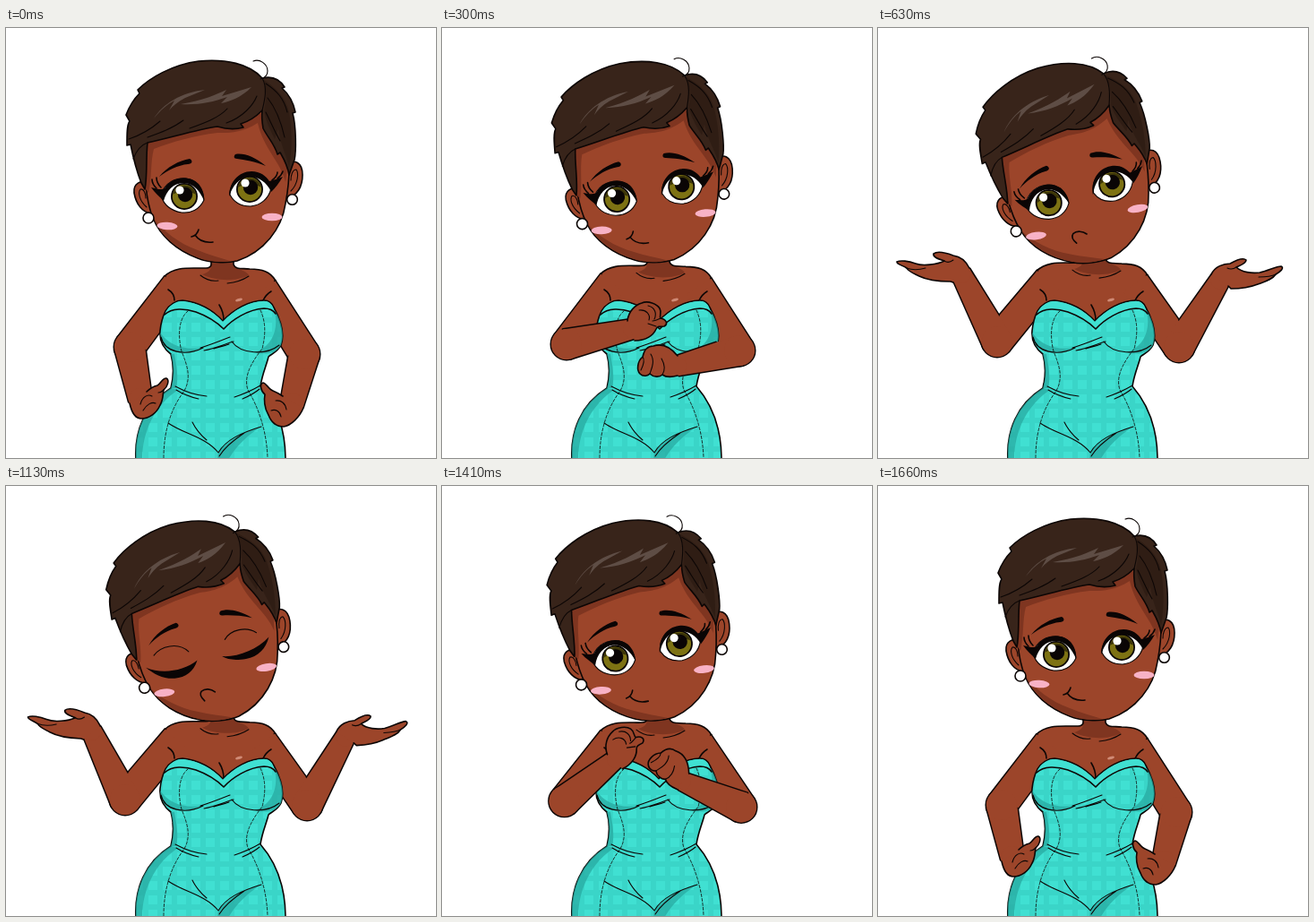
Recreate the animation shown at these times as an HTML page. Size 480 px wide and 480 px high, loop 1710 ms.

```html
<!DOCTYPE html>
<html lang="en">
<head>
<meta charset="utf-8">
<title>Shrug</title>
<style>
html, body { margin: 0; width: 100%; height: 100%; overflow: hidden; background: #fff; }
svg { display: block; width: 100vw; height: 100vh; }
.skin { fill: #9c452a; }
.line { stroke: #0c0605; stroke-width: 1.6; stroke-linecap: round; stroke-linejoin: round; }
.edge { fill: none; stroke: #0c0605; stroke-width: 3; stroke-linecap: round; }
.thin { stroke-width: 1.1; }
.none { fill: none; }
.shade { fill: #7f3520; }
.hair { fill: #38241a; }
.ink { fill: #0a0505; }
.fold { fill: #27a89f; }
</style>
</head>
<body>
<svg viewBox="0 0 480 480">
  <defs>
    <pattern id="plaid" x="9" y="3" width="16" height="16" patternUnits="userSpaceOnUse">
      <rect width="16" height="16" fill="#40e0d2"/>
      <path d="M0 0H6V16H0ZM0 0H16V6H0Z" fill="#22a9a0" opacity=".2"/>
    </pattern>
    <g id="iris">
      <circle r="15" class="ink"/>
      <circle r="13.2" fill="#7d7213"/>
      <path d="M-13 -2C-10 -16 10 -16 13 -2C8 -6 -8 -6 -13 -2Z" fill="#3c3509"/>
      <circle cx="1" cy="-2" r="8.200" class="ink"/>
      <circle cx="-5" cy="-7" r="4.600" fill="#fff"/>
    </g>
  </defs>

  <g id="torso">
    <path id="chest" class="skin"/>
    <path id="neck" class="shade"/>
    <path id="slope" class="line none"/>
    <path id="bones" class="line thin none"/>
  </g>
  <g id="upper"></g>
  <path d="M181 292C186 295 188 299 188 304M296 294C291 297 289 300 287 304M238 309C241 314 243 319 243 326" class="line none"/>
  <ellipse cx="260" cy="303.5" rx="4" ry="1.5" fill="#d08b76" transform="rotate(-15 260 303.5)"/>

  <g id="dress">
    <path fill="url(#plaid)" class="line" d="M178 316C182 309 190 304 197 304C215 306 230 314 242 327C254 314 272 304 288 304C294 304 297 307 299 312C306 325 312 340 307 354C303 362 296 364 293 367C291 376 286 386 284 400C298 416 312 440 312 482L145 482C143 450 155 420 184 402C187 390 187 375 184 364C176 358 171 350 172 338C173 328 175 322 178 316Z"/>
    <g class="fold" opacity=".7">
      <path d="M184 402C155 420 143 450 145 482H152C152 452 165 422 192 404Z"/>
      <path d="M300 315C306 325 312 340 307 354C303 362 290 366 278 362C299 354 304 335 300 315Z"/>
      <path d="M172 340C173 354 182 364 200 362C208 361 214 359 219 357C198 360 182 354 172 340Z"/>
      <path d="M184 364C188 380 187 392 184 402L190 402C193 390 190 375 188 364Z"/>
      <path d="M237 474C248 460 264 452 283 446C268 456 256 468 248 482H236Z"/>
    </g>
    <path fill="#40e0d2" d="M178 318C182 309 190 305 197 305C215 307 230 315 242 328C254 315 272 305 288 305C294 305 297 308 300 317C296 313 292 313 288 313C270 314 252 326 243 336C236 329 226 322 212 317C200 313 185 312 178 318Z"/>
    <path class="line none" d="M177 320C185 312 200 313 212 317C226 322 236 329 243 336C252 326 270 314 288 313C296 313 299 316 301 319"/>
    <path class="line none" stroke-dasharray="3 2" style="stroke-width:.8" d="M203 316C192 325 192 345 196 361C204 380 206 392 199 405C184 425 176 450 176 480M284 315C290 328 290 342 286 358C270 378 266 392 270 404C282 424 291 450 292 480"/>
    <path class="line thin none" d="M173 345C177 362 200 367 220 357M252 350C262 364 290 366 305 354M217 357C228 354 240 349 250 345M221 360C232 358 244 353 254 350M232 358C238 356 244 355 249 353M189 400C200 406 212 410 224 411M190 404C198 409 206 412 215 414M284 399C274 405 264 409 255 412M283 403C277 408 271 411 264 414"/>
    <path class="line thin none" d="M181 441C200 454 222 456 237 474C245 460 262 452 285 445M266 452C254 460 244 468 238 478M208 440C212 448 218 455 224 460"/>
  </g>

  <g id="head">
    <path class="skin line" d="M160 175C150 168 142 174 143 184C145 196 152 206 162 207ZM314 152C322 146 331 150 331 164C331 176 326 188 312 190Z"/>
    <path class="line thin none" d="M157 200C149 193 147 184 150 180C154 179 156 185 156 190M318 182C326 174 327 162 324 158C320 158 318 164 318 170"/>
    <path class="skin line" d="M155 125C155 165 155 190 164 212C172 232 190 248 214 257C226 262 246 263 258 260C288 250 308 224 312 196C317 170 318 140 312 110L290 80H200Z"/>
    <path class="shade" d="M165 213C173 232 191 247 214 256C226 261 240 262 250 260C238 256 226 253 214 248C192 240 176 227 165 213Z"/>
    <path class="shade" d="M157 115L280 85L288 104C292 124 306 136 314 156L312 172C306 148 288 136 281 106C262 118 248 117 236 117C210 120 186 127 165 135C161 150 163 168 159 184L156 180Z"/>
    <circle cx="159" cy="212" r="6" fill="#fff" class="line"/>
    <circle cx="319.500" cy="191.500" r="5.800" fill="#fff" class="line"/>
    <g fill="#f8b2c6">
      <ellipse cx="180" cy="221" rx="11.5" ry="4.300" transform="rotate(3 180 221)"/>
      <ellipse cx="297" cy="211" rx="11.5" ry="4.300"/>
    </g>
    <path class="hair line" d="M151 173C146 160 142 145 139 130L135 131C135 118 135 108 138 104L134 97C139 84 146 76 149 73L147 69C160 56 185 41 215 37C245 34 272 40 286 56C298 53 306 58 311 66L308 67C316 74 321 84 323 94L320 95C324 110 324 138 322 147L316 164C314 152 310 146 306 139L303 141C300 130 292 122 287 112C286 106 285 100 286 92C280 98 272 104 262 107L265 111C254 114 246 113 236 110C215 113 185 122 158 128C156 145 158 165 155 180Z"/>
    <path fill="#2a1911" opacity=".6" d="M288 58C300 66 312 76 316 94C319 112 320 132 316 156C312 138 306 130 304 112L300 124C294 112 290 104 288 92C291 80 291 68 288 58Z"/>
    <path class="line thin none" d="M286 56C292 66 289 80 286 92M290 62C302 70 310 78 314 94M292 78C300 88 306 100 311 122M290 94C296 106 300 116 306 126M137 124C152 119 164 111 172 104M158 122C172 117 186 112 198 103M205 112C222 106 238 100 247 90M246 106C264 100 276 86 280 76M142 146C146 136 152 130 158 128"/>
    <path fill="#5e4d45" d="M165 101C175 85 195 72 222 69L200 78C192 82 186 87 182 92L188 81C180 85 172 92 165 101ZM195 85C220 81 235 74 246 69L241 76L274 66C262 78 250 82 240 84L247 77C230 83 215 86 195 85Z"/>
    <path class="line thin none" d="M276 37C283 34 292 40 292 48C292 53 288 56 284 57"/>
    <path class="ink" d="M171 166C180 155 193 148 205 146C209 148 208 152 203 152C192 153 180 159 171 166ZM256 141C264 139 277 143 290 154C278 149 266 147 258 146C254 146 254 143 256 141Z"/>
    <g id="open">
      <path fill="#fff" class="line thin" d="M173 187C177 172 190 167 201 168C212 169 220 179 221 192C216 203 206 207 196 206C184 204 176 197 173 187ZM250 186C250 172 260 163 272 162C284 162 292 170 296 179C293 191 284 198 273 199C262 199 254 194 250 186Z"/>
      <use href="#iris" x="199" y="188"/>
      <use href="#iris" x="272" y="180"/>
      <path class="ink" d="M162 178C170 180 174 181 177 179C184 167 204 163 215 174C219 179 222 186 221 193C217 182 209 174 200 173C188 172 179 181 176 193C172 189 166 184 162 178ZM249 188C249 172 260 160 274 160C284 160 290 165 294 171C298 170 304 168 309 166C305 173 300 179 296 183C291 172 282 166 272 166C260 167 253 176 249 188Z"/>
      <path class="line none" d="M168 179C164 175 163 172 163 169M173 178C169 174 168 170 168 167M297 170C301 167 303 164 303 161M303 168C306 166 308 163 309 160"/>
    </g>
    <g id="shut">
      <path class="ink" d="M164 190C180 200 205 201 222 191C216 203 206 208 194 207C182 206 172 199 164 190ZM250 191C266 195 290 190 305 178C300 190 290 198 276 198C264 198 256 196 250 191Z"/>
      <path class="line thin none" d="M175 178C184 169 204 167 214 180M256 173C264 163 282 162 292 171"/>
    </g>
    <path id="mouth" class="line none"/>
  </g>
  <g id="lower"></g>
</svg>
<script>
const LOOP = 1710, PIVOT = "240 246", ELBOW = 17;
const $ = id => document.getElementById(id);
const rad = a => a * Math.PI / 180;
const mix = (a, b, k) => a + (b - a) * k;

// time, head tilt, arm phase (0 hips, 1 crossed, 2 chin, 3 shrug)
const keys = [
  [0, 0, 0], [100, -.5, .1], [150, -1.5, .3], [200, -2.5, .55], [250, -3.6, .8],
  [300, -4.6, 1], [400, -7, 2], [470, -9, 2.6], [550, -10.8, 3.08], [630, -10.2, 3],
  [1130, -9.1, 2.95], [1180, -8.7, 2.7], [1230, -8.3, 2.3], [1280, -7.9, 2],
  [1360, -6.8, 1.4], [1430, -5, .7], [1510, -3.2, 0], [1560, -2, 0], [1610, -.8, 0], [1660, 0, 0]
];
const shutSpans = [[1130, 1230], [1510, 1610]];
const smile = "M207 233C211 232 214 229 215 225M211 231C215 237 222 240 231 239";
const frown = "M223 237C219 232 219 228 221 226C226 223 232 225 236 229";
const wristSize = [13, 11, 9, 11];

const arms = [
  {
    side: 1, sx: 190, sy: 287,
    ex: [138, 139, 133, 133], ey: [356, 353, 350, 350],
    angle: [78.5, -13, -78.7, -118], len: [60, 76, 71, 86],
    hands: [
      ["M138 419C140 428 144 436 151 436C160 436 168 430 172 421C176 414 175 407 176 404C180 401 183 393 179 391C175 390 173 397 169 399C165 400 160 403 157 406",
       "M150 420C152 412 158 408 163 411M153 427C157 420 163 417 167 419M176 404C174 406 172 407 170 407"],
      ["M207 327C208 316 216 309 223 307C230 304 240 308 243 313C246 318 242 322 244 324C250 325 253 330 248 333C243 333 240 333 239 336C236 343 228 349 215 349",
       "M220 315C228 314 233 320 231 326M230 310C238 312 240 319 237 325M244 324C240 326 238 327 235 327M239 333L230 330"],
      ["M138 277C141 264 158 252 172 248C184 244 204 246 213 247C218 249 214 252 208 252C200 252 196 253 192 254C200 256 212 262 216 267C217 271 212 270 208 268C214 274 205 275 199 271C204 277 198 279 191 275C182 271 170 270 164 274C160 277 157 280 156 283",
       "M188 257C196 260 204 264 208 268M182 263C190 265 196 268 199 271"],
      ["M102 268C98 260 92 255 84 254C76 251 66 249 62 252C61 256 68 258 74 260C66 264 50 266 42 263C34 260 25 259 21 261C21 264 28 265 32 268C34 272 40 274 46 277C56 282 72 283 81 283L84 284",
       "M32 268C40 271 46 270 53 268M84 259C80 262 77 262 74 260"]
    ]
  },
  {
    side: -1, sx: 287, sy: 291,
    ex: [333, 332, 337, 336], ey: [364, 360, 356, 356],
    angle: [104, 166, 260, 301.5], len: [57.7, 72, 72, 88],
    hands: [
      ["M332 424C328 434 318 444 310 445C302 445 296 440 293 432C288 424 288 414 289 409C284 405 283 397 287 396C290 396 293 403 298 405C303 407 306 409 309 411",
       "M301 416C307 415 312 419 313 426M296 427C301 425 306 428 307 434"],
      ["M263 366C254 355 245 352 236 355C228 355 225 362 224 367C218 372 217 382 221 386C225 390 230 388 232 386C236 390 243 390 246 387C250 390 256 390 263 388",
       "M224 367C227 371 224 378 222 382M233 364C238 372 234 380 232 386M245 369C249 376 249 382 246 387"],
      ["M333 283C328 268 312 259 302 255C290 251 268 254 256 259C250 262 254 265 260 264C266 263 272 262 276 263C266 266 252 272 249 277C249 281 256 280 262 276C256 281 254 285 257 286C262 286 268 282 273 279C267 284 266 289 271 289C278 288 286 282 294 284C302 283 312 284 315 288",
       "M262 276C268 272 274 270 279 269M273 279C278 276 282 275 286 274"],
      ["M372 275C376 266 386 263 393 263C400 259 408 256 411 259C411 263 404 265 400 267C406 273 418 274 426 273C436 271 444 266 450 266C454 268 449 272 444 275C440 281 432 283 424 286C414 290 402 291 394 291L391 288",
       "M444 275C438 278 432 278 425 278M390 268C394 270 397 269 400 267"]
    ]
  }
];

function add(parent, tag, cls) {
  const el = document.createElementNS("http://www.w3.org/2000/svg", tag);
  el.setAttribute("class", cls);
  return parent.appendChild(el);
}
const set = (el, name, value) => el.setAttribute(name, value);
const show = (el, on) => set(el, "visibility", on ? "visible" : "hidden");
const pt = p => p[0].toFixed(2) + " " + p[1].toFixed(2);
const between = (a, b, k) => [mix(a[0], b[0], k), mix(a[1], b[1], k)];
const heading = (a, b) => Math.atan2(b[1] - a[1], b[0] - a[0]);

function disc(el, c, r) {
  set(el, "cx", c[0]);
  set(el, "cy", c[1]);
  set(el, "r", r);
}

function track(list, phase) {
  const i = Math.min(2, Math.floor(phase));
  return mix(list[i], list[i + 1], phase - i);
}

// the four corners of a tapered limb
function limb(a, b, ra, rb) {
  const d = heading(a, b);
  const at = (p, r) => [p[0] - Math.sin(d) * r, p[1] + Math.cos(d) * r];
  return [at(a, ra), at(b, rb), at(b, -rb), at(a, -ra)];
}

for (const arm of arms) {
  const up = $("upper"), low = $("lower");
  arm.upLine = add(up, "path", "edge");
  arm.capLine = add(up, "circle", "edge");
  arm.upFill = add(up, "path", "skin");
  arm.capFill = add(up, "circle", "skin");
  arm.lowLine = add(low, "path", "edge");
  arm.lowFill = add(low, "path", "skin");
  arm.elbow = add(low, "circle", "skin");
  arm.cuff = add(low, "circle", "skin");
  arm.hand = add(low, "g", "");
  arm.palm = add(arm.hand, "path", "skin line");
  arm.fingers = add(arm.hand, "path", "line thin none");
}

function wrist(arm, phase) {
  const a = rad(track(arm.angle, phase)), n = track(arm.len, phase);
  return [track(arm.ex, phase) + Math.cos(a) * n, track(arm.ey, phase) + Math.sin(a) * n];
}

function poseArm(arm, phase, lift) {
  const s = [arm.sx, arm.sy - lift];
  const e = [track(arm.ex, phase), track(arm.ey, phase)];
  const w = wrist(arm, phase), rw = track(wristSize, phase);
  const u = limb(s, e, 16, ELBOW), f = limb(e, w, ELBOW, rw);
  const [o1, o2, i1, i2] = arm.side > 0 ? [u[0], u[1], u[3], u[2]] : [u[3], u[2], u[0], u[1]];
  set(arm.upLine, "d", `M${pt(o1)}L${pt(o2)}M${pt(between(i1, i2, .4))}L${pt(i2)}`);
  set(arm.upFill, "d", `M${u.map(pt).join("L")}Z`);
  for (const c of [arm.capLine, arm.capFill, arm.elbow]) disc(c, e, ELBOW);
  disc(arm.cuff, w, rw - .3);

  // an open elbow hides the forearm edge up to the crook; a folded one shows it
  const diff = heading(e, w) - heading(s, e);
  const turn = Math.atan2(Math.sin(diff), Math.cos(diff));
  const folded = Math.abs(turn) > rad(125);
  const cut = folded ? 0 : ELBOW * Math.tan(Math.abs(turn) / 2) / track(arm.len, phase);
  const a = between(f[0], f[1], turn > 0 ? cut : 0);
  const b = between(f[3], f[2], turn < 0 ? cut : 0);
  set(arm.lowLine, "d", `M${pt(a)}L${pt(f[1])}M${pt(b)}L${pt(f[2])}`);
  set(arm.lowFill, "d", `M${f.map(pt).join("L")}Z`);

  const i = Math.min(3, Math.round(phase));
  const spin = track(arm.angle, phase) - arm.angle[i], base = wrist(arm, i);
  set(arm.palm, "d", arm.hands[i][0]);
  set(arm.fingers, "d", arm.hands[i][1]);
  set(arm.hand, "transform", `translate(${pt(w)}) rotate(${spin}) translate(${-base[0]} ${-base[1]})`);
}

function poseTorso(lift) {
  const y = v => (v - lift).toFixed(2);
  const left = `229 252V${y(264)}C229 ${y(269)} 222 ${y(268)} 214 ${y(268)}C202 ${y(268)} 188 ${y(267)} 177 ${y(277)}`;
  const right = `301 ${y(282)}C295 ${y(272)} 286 ${y(269)} 272 ${y(269)}C264 ${y(268)} 256 ${y(270)} 254 ${y(264)}V252`;
  set($("chest"), "d", `M${left}L180 335H304L${right}Z`);
  set($("slope"), "d", `M${left}M${right}`);
  set($("neck"), "d", `M229 252H254V${y(265)}C258 ${y(270)} 268 ${y(270)} 271 ${y(276)}C258 ${y(283)} 234 ${y(283)} 219 ${y(275)}C226 ${y(273)} 229 ${y(270)} 229 ${y(265)}Z`);
  set($("bones"), "d", `M217 ${y(276)}C223 ${y(281)} 230 ${y(283)} 237 ${y(282)}M247 ${y(285)}C257 ${y(284)} 265 ${y(281)} 271 ${y(277)}`);
}

function draw(t) {
  const [, tilt, phase] = keys.filter(k => k[0] <= t).pop();
  const lift = -tilt * .58;
  const shut = shutSpans.some(([a, b]) => t >= a && t < b);
  poseTorso(lift);
  for (const arm of arms) poseArm(arm, phase, lift);
  set($("head"), "transform", `rotate(${tilt} ${PIVOT})`);
  set($("open"), "transform", `translate(${-tilt * .15} ${tilt * .08})`);
  show($("open"), !shut);
  show($("shut"), shut);
  set($("mouth"), "d", t >= 470 && t < 1230 ? frown : smile);
}

const start = performance.now();
function tick() {
  draw((performance.now() - start) % LOOP);
  requestAnimationFrame(tick);
}
tick();
</script>
</body>
</html>
```
